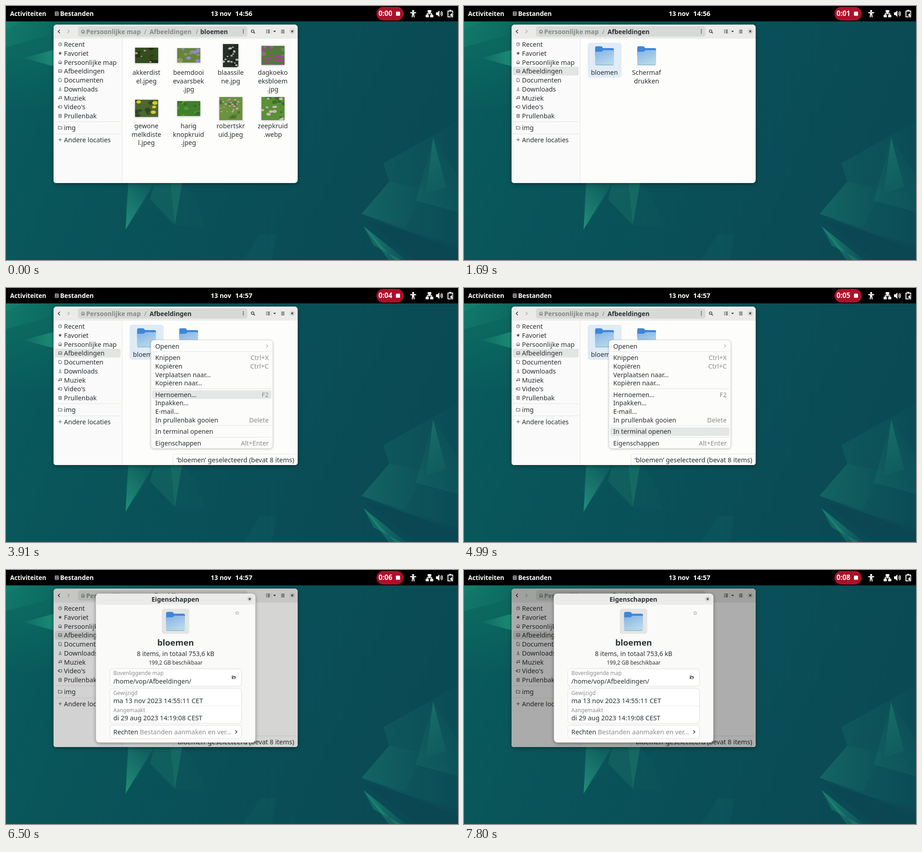
Animation of 998x561 px, one loop 8 s. Source, as an HTML page:

```html
<!DOCTYPE html>
<html lang="nl">
<head>
<meta charset="utf-8">
<title>Bestanden</title>
<style>
html, body { margin: 0; width: 100%; height: 100%; overflow: hidden; background: #0a4e57; }
svg { display: block; width: 998px; height: 561px; font-family: "Noto Sans", "Open Sans", sans-serif; }
text { white-space: pre; }
.b { font-weight: 700; }
.dim { fill: #8a8b8b; }
.shadow { filter: drop-shadow(0 2px 4px rgba(0, 0, 0, .4)); }
.soft { filter: drop-shadow(0 1px 2px rgba(0, 0, 0, .25)); }
.card { filter: drop-shadow(0 .5px 1px rgba(0, 0, 0, .25)); }
</style>
</head>
<body>
<svg id="stage" viewBox="0 0 998 561"></svg>
<script>
const INK = '#2b3033';
const rect = (x, y, w, h, fill, r = 0, more = '') =>
  `<rect x="${x}" y="${y}" width="${w}" height="${h}" rx="${r}" fill="${fill}" ${more}/>`;
const text = (x, y, s, size = 14.3, more = '') =>
  `<text x="${x}" y="${y}" font-size="${size}" ${more}>${s}</text>`;
const bold = (x, y, s, size = 13.9, more = '') => text(x, y, s, size, `class="b" ${more}`);
const MID = 'text-anchor="middle"', END = 'text-anchor="end"';
const poly = (points, fill, alpha) => `<polygon points="${points}" fill="${fill}" opacity="${alpha}"/>`;
const line = (d, width = 1.1, color = INK, more = '') =>
  `<path d="${d}" fill="none" stroke="${color}" stroke-width="${width}" ${more}/>`;
const solid = (d, fill = INK) => `<path d="${d}" fill="${fill}"/>`;
const group = (id, body, more = '') => `<g id="${id}" ${more}>${body}</g>`;
const at = (x, y, body) => `<g transform="translate(${x} ${y})">${body}</g>`;

const HOUSE = 'M-4 0 0-4 4 0M-3-.5V3.5H3V-.5M-1 3.5V1H1V3.5';
const FOLDER = 'M-4 3.2V-3.2H-1L0-2H4V3.2Z';
const STAR = 'M0-4 1.1-1.2 4-1.1 1.7.8 2.5 3.6 0 2-2.5 3.6-1.7.8-4-1.1-1.1-1.2Z';

function desktop() {
  return rect(0, 0, 998, 561, 'url(#wall)') +
    rect(0, 34, 400, 200, 'url(#glow)') +
    poly('0,34 105,34 105,62 0,91', 'url(#toRight)', .2) +
    poly('0,34 42,34 0,52', '#25a57c', .12) +
    poly('38,115 105,97 105,133', 'url(#toLeft)', .6) +
    poly('270,391 327,391 264,494', 'url(#toFoot)', .75) +
    poly('270,391 262,450 290,462 327,391', '#27846f', .1) +
    poly('327,391 389,391 373,484 318,427', '#27866f', .24) +
    poly('363,391 389,391 373,484', '#3aa184', .16) +
    poly('389,391 415,420 441,490 373,484', '#28786b', .08) +
    poly('560,504 597,504 587,561 524,561', '#1b7569', .14) +
    poly('998,255 833,347 846,388 785,459 998,540', 'url(#toRight)', .17) +
    poly('943,291 998,375 998,455 905,430', 'url(#toFoot)', .15) +
    poly('943,291 972,400 927,414', 'url(#toTop)', .34) +
    poly('846,388 925,405 880,490 785,459', 'url(#toRight)', .14) +
    poly('789,486 812,529 872,561 858,561', '#16916f', .45) +
    poly('789,486 883,561 845,561', 'url(#toRight)', .55) +
    poly('792,472 998,528 998,561 905,561', '#0a3c49', .2);
}

function topBar() {
  const white = (d, width) => line(d, width, '#fff');
  return rect(0, 0, 998, 34, '#000') +
    `<g fill="#fff">` +
    bold(9, 22, 'Activiteiten', 13.7) + bold(119.5, 22, 'Bestanden') +
    bold(452, 22, '13 nov', 14) + bold(506, 22, '14:56', 14.8, 'id="clock"') +
    at(112, 17, white('M-3.2-4H3.2V4H-3.2ZM-3.2 0H3.2M-1.2-2H1.2M-1.2 2H1.2', 1.2)) +
    rect(818, 2, 60, 30, '#ad1029', 15) +
    text(822.5, 22, '0:00', 15.2, 'id="timer" font-weight="600"') +
    rect(861, 12.5, 9, 9, '#fff', 1) +
    at(899, 17, '<circle cy="-6" r="2.3"/>' +
      solid('M-6.5-3.4H6.5V-1.3L2.3-.7 3.2 8H1.2L.3 2.5H-.3L-1.2 8H-3.2L-2.3-.7-6.5-1.3Z', '#fff')) +
    at(935, 17, rect(-4, -8, 8, 6, '#fff', 1) + rect(-8.5, 2.5, 7, 5.5, '#fff', 1) +
      rect(1.5, 2.5, 7, 5.5, '#fff', 1) + white('M0-3V0M-5 3V0H5V3', 1.8)) +
    at(958, 17, solid('M-8.5-3H-5.5L-1-7V7L-5.5 3H-8.5Z', '#fff') +
      white('M1.5-3Q4 0 1.5 3M3.5-5.5Q8 0 3.5 5.5', 1.7)) +
    at(981, 17, white('M-5.2 7V-5.8H5.2V7ZM-2.2-7.5H2.2', 2) +
      '<path d="M4-2-1.5 4H2L1 8.5 7.5 2.5H4Z" stroke="#000" stroke-width="1.4" paint-order="stroke"/>') + '</g>';
}

function header() {
  const grey = 'fill="#858a87"';
  return solid('M105 72V49Q105 41 113 41H636Q644 41 644 49V72Z', '#ebebea') +
    rect(159, 45, 374, 22.5, '#d7d9d6', 5) +
    line('M119 52.5 115.2 56.2 119 60', 1.5) +
    line('M136 52.5 139.8 56.2 136 60', 1.5, '#b0b1b0') +
    at(170, 56.5, line(HOUSE, 1.1, '#777b79')) +
    bold(177, 62, 'Persoonlijke map', 13.9, grey) + text(305, 62, '/', 14.3, grey) +
    bold(317, 62, 'Afbeeldingen', 13.9, 'id="crumb"') +
    group('subCrumb', text(419, 62, '/', 14.3, grey) + bold(429, 62, 'bloemen')) +
    [52.5, 56, 59.5].map(y => `<circle cx="524" cy="${y}" r="1.1"/>`).join('') +
    line('M546.5 57.5 549.5 60.5', 1.6) +
    `<circle cx="544.5" cy="55.5" r="2.9" fill="none" stroke="${INK}" stroke-width="1.3"/>` +
    line('M574.5 53.3H576.5M578 53.3H582.5M574.5 56.3H576.5M578 56.3H582.5M574.5 59.3H576.5M578 59.3H582.5', 1.5) +
    line('M586.5 50V62', 1, '#d0d0d0') + solid('M590 54.7H596L593 58Z') +
    line('M607.5 53.3H615M607.5 56.3H615M607.5 59.3H615', 1.3) +
    close(632, 56);
}

function close(x, y) {
  return at(x, y, '<circle r="6" fill="#d8d8d7"/>' + line('M-2-2 2 2M2-2-2 2', 1.4));
}

function sidebar() {
  const places = [
    ['Recent', 'M-3.6 0A3.6 3.6 0 1 1 3.6 0 3.6 3.6 0 1 1-3.6 0M0-2V0H2'],
    ['Favoriet', STAR],
    ['Persoonlijke map', HOUSE],
    ['Afbeeldingen', 'M-3.5-3H3.5V3H-3.5ZM-3 2-1 0 1 1.5 3-.5'],
    ['Documenten', 'M-2.8-3.7H.8L2.8-1.5V3.7H-2.8Z'],
    ['Downloads', 'M0-4V1.5M-2.2-.5 0 1.8 2.2-.5M-3.3 3.6H3.3'],
    ['Muziek', 'M-1.5 2.3V-2.7L3.2-3.5V1.5M-3.5 2.3H-1.5V.6H-3.5ZM1.2 1.5H3.2V0H1.2Z'],
    ["Video's", 'M-2-2.7H3.7V2.7H-2ZM-2 0-4.3-1.8V1.8Z'],
    ['Prullenbak', 'M-3.8-2.5H3.8M-2.8-2.5V3.7H2.8V-2.5M-1-3.7H1M-.8-.7V2M.8-.7V2'],
  ];
  const row = (y, name, icon) =>
    at(119.5, y, icon === STAR ? solid(icon, '#4b4f51') : line(icon, 1, '#4b4f51')) + text(128, y + 5.5, name);
  return solid('M105 72H256V391H111Q105 391 105 385Z', '#fafafa') +
    rect(256, 72, 1, 319, '#e4e4e3') +
    rect(108, 134, 145, 19.5, '#e3e5e2', 4, 'id="place"') +
    places.map(([name, icon], i) => row(84.5 + i * 19.75, name, icon)).join('') +
    rect(108, 255, 145, 1, '#e2e2e1') + rect(108, 282, 145, 1, '#e2e2e1') +
    row(268.8, 'img', FOLDER) + row(295.3, 'Andere locaties', 'M-3.7 0H3.7M0-3.7V3.7');
}

let seed = 7;
const random = () => (seed = seed * 16807 % 2147483647) / 2147483647;

function thumbnail([x, y, w, h, leaf, shade, petal, count, size]) {
  let marks = '';
  const blob = (r, fill, alpha) => {
    marks += `<ellipse cx="${(random() * w).toFixed(1)}" cy="${(random() * h).toFixed(1)}" rx="${r}" ry="${r * .7}" fill="${fill}" opacity="${alpha}"/>`;
  };
  for (let i = 0; i < 14; i++) blob(3 + random() * 4, i % 2 ? shade : leaf, .7);
  for (let i = 0; i < count; i++) blob(size * (.6 + random() * .6), petal, .9);
  return `<svg x="${x}" y="${y}" width="${w}" height="${h}" style="width:${w}px;height:${h}px" class="soft">${rect(0, 0, w, h, leaf)}${marks}</svg>`;
}

function flowers() {
  const photos = [
    [285, 92, 51, 34, '#344d1d', '#1d2a12', '#c79aa8', 4, 3],
    [378, 93, 51, 32, '#66843c', '#94a06c', '#9a87d6', 7, 5],
    [479, 84, 34, 51, '#252f27', '#151c18', '#c5bcc0', 16, 3],
    [564, 88, 51, 42, '#54793c', '#7d8a68', '#c22eae', 24, 3],
    [285, 207, 51, 38, '#4d6632', '#273c1b', '#efd51c', 4, 5],
    [378, 210, 51, 33, '#40802c', '#5ea03e', '#326b24', 7, 5],
    [471, 201, 51, 51, '#6b923e', '#476a2b', '#dca0c4', 20, 2.4],
    [564, 201, 51, 51, '#5a9036', '#35622a', '#d9b8ce', 12, 4],
  ];
  const names = ['akkerdist|el.jpeg', 'beemdooi|evaarsbek|.jpg', 'blaassile|ne.jpg', 'dagkoeko|eksbloem|.jpg',
    'gewone|melkdiste|l.jpeg', 'harig|knopkruid|.jpeg', 'robertskr|uid.jpeg', 'zeepkruid|.webp'];
  return photos.map(thumbnail).join('') + names.map((name, i) =>
    caption(310 + i % 4 * 93, i < 4 ? 152.3 : 270, name)).join('');
}

function caption(x, y, name) {
  return name.split('|').map((s, i) => text(x, y + i * 18.5, s, 14.3, MID)).join('');
}

function folder(x, y) {
  return at(x, y,
    solid('M0 4Q0 0 3 0H13Q15 0 16 2L17.5 4H38.5Q41.5 4 41.5 7V20H0Z', '#3d87d8') +
    solid('M0 14Q0 12 2 12H13Q15 12 16 10.5L17 9.5Q18 8.5 20 8.5H39.5Q41.5 8.5 41.5 10.5V38.5Q41.5 41.5 38.5 41.5H3Q0 41.5 0 38.5Z', 'url(#folder)') +
    rect(1, 40.8, 39.5, 1, '#6d9fc4', .5));
}

function folders() {
  return rect(273, 81, 75, 77.5, '#d4e4f3', 6, 'id="tile"') +
    folder(289.5, 89) + folder(382.5, 89) +
    caption(310, 152.3, 'bloemen') + caption(403, 152.3, 'Schermaf|drukken');
}

const rows = [128.5, 153.8, 172.6, 191.4, 210.2, 235.5, 254.2, 273, 291.8, 317.2, 342.5];

function menu() {
  const labels = ['Openen', 'Knippen', 'Kopiëren', 'Verplaatsen naar…', 'Kopiëren naar…', 'Hernoemen…',
    'Inpakken…', 'E-mail…', 'In prullenbak gooien', 'In terminal openen', 'Eigenschappen'];
  const keys = { 1: 'Ctrl+X', 2: 'Ctrl+C', 5: 'F2', 8: 'Delete', 10: 'Alt+Enter' };
  return rect(320, 115, 269, 239.5, '#fcfcfb', 7, 'class="soft" stroke="#d0d0cf" stroke-width=".6"') +
    rect(323, 0, 263, 19, '#e5e6e6', 4, 'id="hover"') +
    [140, 222, 303, 329].map(y => rect(323, y, 263, 1, '#e3e3e2')).join('') +
    labels.map((s, i) => text(329.5, rows[i] + 5.2, s, 14.2) +
      (keys[i] ? text(580, rows[i] + 5.2, keys[i], 14.2, `class="dim" ${END}`) : '')).join('') +
    line('M574.5 125 578 128.3 574.5 131.6', 1.1, '#a0a2a2');
}

function dialog() {
  const card = (y, h) => rect(230, y, 289.5, h, '#fff', 6, 'class="card"');
  const field = (y, label, value, size) =>
    text(237, y, label, 11.8, 'class="dim"') + text(237, y + 18.8, value, size);
  return rect(198.5, 52, 352, 329, '#fafaf8', 8, 'class="shadow"') +
    solid('M198.5 76.5V60Q198.5 52 206.5 52H542.5Q550.5 52 550.5 60V76.5Z', '#ebebea') +
    bold(374, 69.5, 'Eigenschappen', 14, MID) + close(538, 64) +
    rect(344, 85.5, 60.5, 55.5, '#e5e5e3', 5) + folder(353.5, 92.5) +
    at(510.5, 95, line(STAR, .9, '#a0a2a2')) +
    bold(374.5, 167, 'bloemen', 18.5, MID) +
    text(374.5, 190, '8 items, in totaal 753,6 kB', 14.2, MID) +
    text(374.5, 209.3, '199,2 GB beschikbaar', 11.7, MID) +
    card(218.5, 37.5) + card(262, 76) + card(343.5, 28) + rect(230, 300, 289.5, 1, '#ececeb') +
    field(232, 'Bovenliggende map', '/home/vop/Afbeeldingen/', 14.1) +
    at(503, 237, line('M-3.7 3V-3H-1L0-2H2.7V-.5M-3.7 3-2-.5H4L2.7 3Z')) +
    field(275.5, 'Gewijzigd', 'ma 13 nov 2023 14:55:11 CET', 14.5) +
    field(313.5, 'Aangemaakt', 'di 29 aug 2023 14:19:08 CEST', 14.4) +
    text(237, 363, 'Rechten', 14.3) + text(295.5, 363, 'Bestanden aanmaken en ver…', 14.3, 'class="dim"') +
    line('M506.3 354 509.8 357.5 506.3 361', 1.5);
}

const fadeFill = (id, ends) => `<linearGradient id="${id}" ${ends}>
  <stop stop-color="#2aa484" stop-opacity=".15"/><stop offset="1" stop-color="#2aa484"/></linearGradient>`;

const stage = document.getElementById('stage');
stage.innerHTML = `<defs>
  <linearGradient id="wall" x2="1" y2=".25"><stop stop-color="#085d5d"/><stop offset=".4" stop-color="#095359"/><stop offset="1" stop-color="#0a4a55"/></linearGradient>
  <radialGradient id="glow" cx="0" cy="0" r="1"><stop stop-color="#108069" stop-opacity=".5"/><stop offset="1" stop-color="#108069" stop-opacity="0"/></radialGradient>
  <linearGradient id="folder" x2=".5" y2="1"><stop stop-color="#87b1e6"/><stop offset="1" stop-color="#b5d9ea"/></linearGradient>
  ${fadeFill('toRight', 'x1="1" x2="0"')}${fadeFill('toLeft', '')}
  ${fadeFill('toFoot', 'x1=".6" x2="0" y2="1"')}${fadeFill('toTop', 'x2="0" y1="1" y2="0"')}
  </defs>` + desktop() + topBar() +
  group('window', rect(105, 41, 539, 350, '#fdfdfc', 7, 'class="shadow"') + header() + sidebar() +
    group('flowers', flowers()) + group('folders', folders()) +
    group('status', solid('M368.5 391V371Q368.5 366.5 373 366.5H644V385Q644 391 638 391Z', '#fcfcfb') +
      line('M368.5 391V371Q368.5 366.5 373 366.5H644', 1, '#e3e3e2') +
      text(506.5, 385, '‘bloemen’ geselecteerd (bevat 8 items)', 14.5, MID)) +
    rect(105, 41, 539, 350, '#000', 7, 'id="shade"'), `fill="${INK}"`) +
  group('menu', menu(), `fill="${INK}"`) + group('dialog', dialog(), `fill="${INK}"`);

const el = {};
stage.querySelectorAll('[id]').forEach(node => el[node.id] = node);
const ramp = (t, from, to) => Math.min(1, Math.max(0, (t - from) / (to - from)));
const fade = (node, value) => node.setAttribute('opacity', value);

// [start time, menu row under the pointer]
const hovers = [[3640, 1], [3760, 3], [3870, 5], [4160, 6], [4260, 7], [4660, 8], [4990, 9], [5310, 10]];

function draw(t) {
  const moved = t >= 760;
  el.timer.textContent = '0:0' + Math.floor((t + 205) / 1000);
  el.clock.textContent = t < 2080 ? '14:56' : '14:57';
  fade(el.flowers, moved ? 0 : 1);
  fade(el.folders, moved ? 1 : 0);
  fade(el.subCrumb, moved ? 0 : 1);
  el.crumb.setAttribute('fill', moved ? INK : '#858a87');
  fade(el.place, ramp(t, 540, 740));
  fade(el.tile, .3 * ramp(t, 1390, 1500) + .35 * ramp(t, 1600, 1690) +
    .35 * ramp(t, 1830, 1910) - .25 * ramp(t, 3410, 3500));
  fade(el.status, t < 2080 ? 0 : 1);
  fade(el.menu, ramp(t, 3390, 3480) * (1 - ramp(t, 5780, 5860)));
  const hover = hovers.filter(([start]) => t >= start).pop();
  fade(el.hover, hover ? 1 : 0);
  if (hover) el.hover.setAttribute('y', rows[hover[1]] - 9.5);
  fade(el.shade, .315 * ramp(t, 6240, 6760));
  const open = 1 - (1 - ramp(t, 6170, 6280)) ** 2;
  fade(el.dialog, open);
  el.dialog.setAttribute('transform', `translate(0 ${216.5 * (1 - open)}) scale(1 ${open})`);
}

function tick() {
  draw(performance.now() % 8000);
  requestAnimationFrame(tick);
}
tick();
</script>
</body>
</html>
```
